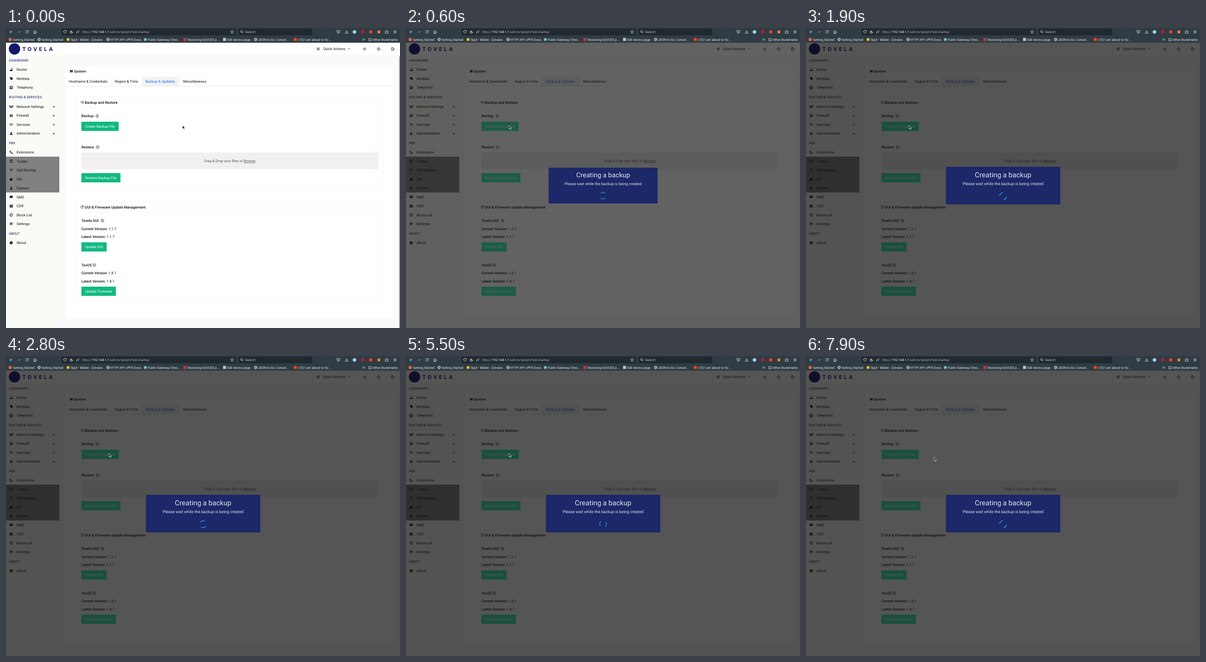
Recreate the animation shown at these times as an HTML page. Size 857 px wide and 653 px high, loop 8000 ms.

```html
<!DOCTYPE html>
<html lang="en">
<head>
<meta charset="utf-8">
<title>System backup</title>
<style>
  html, body { margin: 0; width: 100%; height: 100%; overflow: hidden; background: #fafafa; }
  svg { display: block; width: 857px; height: 653px; text-rendering: geometricPrecision; }
  text { font-family: Roboto, "Noto Sans", sans-serif; white-space: pre; }
  .button { fill: #10b981; }
  .hover #create { fill: #059669; }
  .open .button { fill: #36f0ae; }
  .open #scrollbar { visibility: hidden; }
  #modal { visibility: hidden; }
  .open #modal { visibility: visible; }
</style>
</head>
<body>
<svg id="stage" viewBox="0 0 857 653"></svg>
<script>
const INK = '#111', NAVY = '#14186a', PALE = '#dfe4e8', RULE = '#f4f4f4';

const text = (x, y, s, size = 7.8, fill = INK, more = '') =>
  `<text x="${x}" y="${y}" font-size="${size}" fill="${fill}" ${more}>${s}</text>`;
const bold = (x, y, s, size = 7.9, fill = INK) => text(x, y, s, size, fill, 'font-weight="500"');
const rect = (x, y, w, h, fill, more = '') =>
  `<rect x="${x}" y="${y}" width="${w}" height="${h}" fill="${fill}" ${more}/>`;
const dot = (x, y, r, fill) => `<circle cx="${x}" cy="${y}" r="${r}" fill="${fill}"/>`;
// Icons are drawn around their own centre.
const line = (x, y, d, color = INK, w = 1) =>
  `<path transform="translate(${x} ${y})" d="${d}" fill="none" stroke="${color}" stroke-width="${w}"/>`;
const solid = (x, y, d, color = INK) =>
  `<path transform="translate(${x} ${y})" d="${d}" fill="${color}"/>`;
const ring = r => `M${-r} 0a${r} ${r} 0 1 1 ${2 * r} 0a${r} ${r} 0 1 1 ${-2 * r} 0`;
const info = (x, y) => line(x, y, ring(3) + 'M0 -.5V1.7M0 -1.8V-1', INK, .8);
const globe = x => line(x, 25, ring(3.2) + 'M-3.2 0H3.2M0 -3.2C-2.2 -1 -2.2 1 0 3.2C2.2 1 2.2 -1 0 -3.2', PALE, .8);

const user = 'M-1.6 -1.7a1.6 1.6 0 1 1 3.2 0a1.6 1.6 0 1 1 -3.2 0M-3 3V2Q-3 .6 0 .6Q3 .6 3 2V3Z';
const grid = 'M-3 -2.5H3V2.8H-3ZM-3 -.8H3M-3 1H3M0 -.8V2.8';
const reload = 'M2.4 -1.8A3 3 0 1 0 3 .5M2.8 -3.3V-1.2H.7';

function browser() {
  const marks = [[15, 'Getting Started'], [77.5, 'Getting Started'], [141, 'Spot - Wallet - Zolvane'],
    [227, 'HTTP API | IPFS Docs'], [308, 'Public Gateway Chec...'], [395, 'Resolving EACCES p...'],
    [481, 'Edit device page.'], [548, 'JSON-to-Go: Conver...'], [635.5, '(15) I am about to for...'],
    [798, 'Other Bookmarks']];
  return rect(0, 0, 857, 32, '#303c44') +
    rect(121, 1, 379, 15, '#20292f', 'rx="2"') + rect(505, 1, 161, 15, '#20292f', 'rx="2"') +
    line(11, 8.5, 'M3.5 0H-3M0 -3L-3 0L0 3', '#8fd0ee') +
    line(28.5, 8.5, 'M-3.5 0H3M0 -3L3 0L0 3', '#77828a') +
    line(46, 8.5, reload, PALE) +
    line(63, 8.5, 'M-3.6 0L0 -3.3L3.6 0M-2.6 -.6V3.2H2.6V-.6M0 3V1', PALE) +
    line(128.5, 8.5, 'M0 -3.5L3 -2.5Q3 2 0 3.6Q-3 2 -3 -2.5Z', PALE, .9) +
    line(142, 8.5, 'M-2.6 -.5H1.5V3H-2.6ZM-1.8 -.5V-2Q-.5 -4 .8 -2V-.5M1.5 3L3.5 0', PALE, .9) +
    line(156, 8.5, 'M-3 -1.5H3.3M1.5 -3L3.3 -1.5M3 1.5H-3.3M-1.5 3L-3.3 1.5', PALE, .8) +
    text(164.7, 11.1, 'https://<tspan fill="#fff">192.168.1.1</tspan>/admin/system?tab=backup', 7, '#a3adb4') +
    line(492, 8.5, 'M0 -3.7L1.1 -1.2L3.7 -1L1.7 .8L2.3 3.4L0 2L-2.3 3.4L-1.7 .8L-3.7 -1L-1.1 -1.2Z', PALE, .8) +
    line(513, 8, 'M-2.6 -.5a2.2 2.2 0 1 1 4.4 0a2.2 2.2 0 1 1 -4.4 0M1.3 1.2L3.3 3.3', PALE, .9) +
    text(520, 11.2, 'Search', 7.4, '#b4bcc2') +
    line(723, 8.5, 'M-3 -2.8H3V0Q2.5 3 0 3Q-2.5 3 -3 0ZM-1.5 -.7L0 .8L1.5 -.7', PALE, .9) +
    line(741, 8.5, 'M0 -3.5V1M-2 -1L0 1L2 -1M-3 1V3H3V1', PALE, .9) +
    dot(758, 8.5, 3.8, '#a3d3f0') + dot(776, 8.5, 3.8, '#b3202c') +
    dot(793.5, 8.5, 3.5, '#e5442f') + dot(811, 8.5, 3.6, '#e07a2c') +
    line(828, 8.5, 'M-3 -1.5H-1V-2.5Q0 -4 1 -2.5V-1.5H3V3H-3V1.5Q-.8 .8 -3 .2Z', PALE, .9) +
    line(846, 8.5, 'M-3 -2.3H3M-3 0H3M-3 2.3H3', PALE, .9) +
    dot(9, 25, 3.5, '#e8663a') + globe(72) + dot(135, 25, 3.3, '#e9b52b') + globe(222) +
    dot(303, 25, 3.3, '#6cbcc6') + rect(386, 21.7, 6.5, 6.5, '#cb3837') +
    rect(472, 21.7, 6.5, 6.5, '#b9c9c0') + globe(543) + dot(629.5, 25, 3.6, '#ff4500') +
    line(778, 25, 'M-2.8 -2.5L-.3 0L-2.8 2.5M.4 -2.5L2.9 0L.4 2.5', PALE, .9) +
    line(792, 25, 'M-3 -2.3H-.7L.2 -1.3H3V2.6H-3Z', PALE, .9) +
    marks.map(([x, s]) => text(x, 27.5, s, 7, '#e6eaed')).join('');
}

function header() {
  return rect(0, 32, 857, 28, '#fff') + rect(116, 59.5, 741, .6, '#eee') +
    dot(18.5, 45.5, 12.3, NAVY) +
    text(35.5, 49.6, 'TOVELA', 11.5, NAVY, 'style="font-family:Inter,sans-serif" font-weight="700" letter-spacing="4"') +
    line(679, 45.5, 'M-3 -2H3M-3 0H3M-3 2H3', INK, .9) +
    text(690, 48.2, 'Quick Actions') +
    line(746, 45.2, 'M-2 -1L0 1L2 -1', INK, .9) +
    line(780, 45.8, ring(1.5) + 'M0 -3.6V-2.4M0 2.4V3.6M-3.6 0H-2.4M2.4 0H3.6M-2.5 -2.5L-1.8 -1.8M2.5 -2.5L1.8 -1.8M-2.5 2.5L-1.8 1.8M2.5 2.5L1.8 1.8', INK, .8) +
    line(810.5, 45.8, ring(3) + 'M-1 -.7Q-.8 -1.9 .2 -1.7Q1.6 -1.1 0 .5M0 1.3V2', INK, .8) +
    line(841.5, 45.8, 'M.8 -1.8V-3H-2.8V3H.8V1.8M-1 0H3.2M1.8 -1.5L3.3 0L1.8 1.5', INK, .9);
}

function sidebar() {
  const heads = [[70, 'DASHBOARD'], [150, 'ROUTING &amp; SERVICES'], [250, 'PBX'], [447, 'ABOUT']];
  // y, label, icon path, outlined icon, expandable
  const items = [
    [90.5, 'Router', 'M-3 .5H3V3H-3ZM1 .5H1.8V-2H1ZM-1 -2.3Q1.4 -4.3 3.6 -2.3L3 -1.7Q1.4 -3.2 -.4 -1.7Z'],
    [110, 'Netdata', 'M-3.4 -2.8H0Q3.5 -2.5 3.2 .5Q3 3 0 3Q-1.2 3 -1.8 .5Z'],
    [129.5, 'Telephony', 'M-3 -2.6H3V2.8H-3ZM-1 -2.6V2.8M.5 -.9H2M.5 .6H2M.5 2H2', 1],
    [171, 'Network Settings', 'M0 -1V3.3M-1.7 3.2L0 -1L1.7 3.2M-2 -2.4Q-3.2 -.8 -2 .8M2 -2.4Q3.2 -.8 2 .8M-3.2 -3Q-4.4 0 -3.2 2M3.2 -3Q4.4 0 3.2 2', 1, 1],
    [190.5, 'Firewall', 'M-3 -2.6H-.3V-1H-3ZM.3 -2.6H3V-1H.3ZM-3 -.6H-1.3V1H-3ZM-.8 -.6H.8V1H-.8ZM1.3 -.6H3V1H1.3ZM-3 1.4H-.3V3H-3ZM.3 1.4H3V3H.3Z', 0, 1],
    [210, 'Services', 'M-1.6 -2.2L-3.3 0L-1.6 2.2M1.6 -2.2L3.3 0L1.6 2.2M.7 -2.6L-.7 2.6', 1, 1],
    [229.5, 'Administration', user, 0, 1],
    [270.5, 'Extensions', 'M-2.7 -3L-1 -2.7L-.8 -1L-1.6 -.2Q-.8 1.1 .4 1.7L1.2 .8L2.8 1.2L3 2.8Q1.8 3.4 0 2.4Q-3.2 .2 -2.7 -3', 1],
    [290, 'Trunks', 'M-3.3 -1V-2.4Q0 -3.8 3.3 -2.4V-1M-1 -2.6V-.5Q-2.8 .8 -2.6 2.5H2.6Q2.8 .8 1 -.5V-2.6', 1],
    [309.5, 'Call Routing', 'M0 3V.5L-2.6 -2.3M0 .5L2.6 -2.3M-2.8 -.5V-2.5H-.8M2.8 -.5V-2.5H.8', 1],
    [329, 'IVR', 'M-.4 -3.2H.4V-1.9Q2.5 -1.7 2.6 .3H3.3V2H2.5V3H-2.5V2H-3.3V.3H-2.6Q-2.5 -1.7 -.4 -1.9Z'],
    [348.5, 'Queues', user],
    [368, 'SMS', 'M-3 -2.8H3.2V1.7H-1.7L-3 3Z'],
    [387.5, 'CDR', grid, 1],
    [407, 'Block List', ring(3.2) + 'M-2.3 2.3L2.3 -2.3', 1],
    [426, 'Settings', ring(2.2) + ring(.7) + 'M0 -3.4V-2.2M0 2.2V3.4M-3 -1.7L-2 -1.1M2 1.1L3 1.7M-3 1.7L-2 1.1M2 -1.1L3 -1.7', 1],
  ];
  return rect(0, 60, 116, 593, '#fafaf6') + rect(0, 280, 116, 78, '#808080') +
    heads.map(([y, s]) => text(6.5, y + 2.6, s, 7.25, NAVY)).join('') +
    items.map(([y, s, d, outlined, more]) =>
      (outlined ? line : solid)(11.3, y, d) + text(23, y + 2.8, s) +
      (more ? line(104, y + .3, 'M-2.2 0H2.2M0 -2.2V2.2', INK, .8) : '')).join('') +
    dot(11.3, 467.5, 3.2, INK) +
    line(11.3, 467.5, 'M-1 -.7Q-.8 -1.9 .2 -1.7Q1.6 -1.1 0 .5M0 1.3V2', '#fff', .7) +
    text(23, 470.3, 'About');
}

const button = (y, w, s, id = '') =>
  `<rect class="button" ${id} x="164" y="${y}" width="${w}" height="20" rx="1"/>` +
  text(172, y + 12.6, s, 7.8, '#fff');
const card = (y, h, s, icon) =>
  rect(151.5, y, 670.5, h, '#fff', `rx="2" stroke="${RULE}" stroke-width=".8"`) +
  rect(152, y + 24, 670, .8, RULE) + icon + bold(171.3, y + 15.3, s, 8);
const version = (y, s, n) =>
  bold(164, y, `${s} Version: <tspan font-weight="400">${n}</tspan>`, 7.85);

function content() {
  return rect(128, 82, 717, 548, '#fff', `stroke="${RULE}" stroke-width=".6"`) +
    rect(139, 91.6, 2.8, 2.2, INK) + rect(142.2, 91.6, 3, 2.2, INK) +
    rect(139, 94.2, 2.8, 2.2, INK) + rect(142.2, 94.2, 3, 2.2, INK) +
    bold(147.7, 96.9, 'System') + rect(128, 105.5, 717, .7, RULE) +
    rect(295.5, 106.5, 81.5, 19.5, '#f1f3f5', 'rx="1"') + rect(128, 126, 717, .9, '#e3e5e8') +
    text(136.7, 119.2, 'Hostname &amp; Credentials') + text(236.8, 119.2, 'Region &amp; Time') +
    text(303.5, 119.2, 'Backup &amp; Updates', 7.9, '#2563eb') + text(385.5, 119.2, 'Miscellaneous') +

    card(149.5, 204, 'Backup and Restore', line(166, 162, 'M-2.6 -.3A2.8 2.8 0 1 1 -1.4 2.3M-3.7 -1L-2.6 .3L-1.3 -.9M.3 -1.5V.2L1.4 .9', INK, .8)) +
    bold(164, 194.4, 'Backup') + info(198.5, 191.7) +
    button(204, 81, 'Create Backup File', 'id="create"') +
    bold(164, 262, 'Restore') + info(199.3, 259.3) +
    rect(164, 271, 646, 36.5, '#f1f0ef', 'rx="2.5"') +
    text(431, 292.2, 'Drag &amp; Drop your files or <tspan text-decoration="underline">Browse</tspan>', 7.8, '#555') +
    button(316, 85, 'Restore Backup File') +

    card(377.5, 217, 'GUI &amp; Firmware Update Management', line(165.6, 389.6, reload + 'M0 -1.3V.3L1.2 1', INK, .8)) +
    bold(164, 422, 'Tovela GUI') + info(209.8, 419.3) +
    version(439.5, 'Current', '1.1.7') + version(457, 'Latest', '1.1.7') +
    button(466.5, 55, 'Update GUI') +
    bold(164, 518.8, 'TovOS') + info(192, 516.1) +
    version(536.3, 'Current', '1.8.1') + version(553.8, 'Latest', '1.8.1') +
    button(563, 75, 'Update Firmware') +
    rect(855.3, 62, 1.7, 591, '#8a8a8a', 'id="scrollbar"');
}

// The modal is drawn around its centre so that it can be scaled.
const modal = `<g id="modal">${rect(-124.3, -41, 248.6, 82, '#1c2868', 'rx="2"')}
  ${text(0, -18.5, 'Creating a backup', 15.3, '#e2e6f0', 'text-anchor="middle"')}
  ${text(0, -1, 'Please wait while the backup is being created', 8.75, '#e2e6f0', 'text-anchor="middle"')}
  <path id="spinner" d="M-5.3 -5.3A7.5 7.5 0 0 1 5.3 -5.3M5.3 5.3A7.5 7.5 0 0 1 -5.3 5.3"
    fill="none" stroke="#2778c4" stroke-width="2.1"/></g>`;
const cursor = `<path id="cursor" d="M0 0V7.6L1.8 6.1L3.1 8.9L4.5 8.3L3.2 5.5H5.6Z" fill="#111" stroke="#fff" stroke-width=".7"/>`;

const $ = id => document.getElementById(id);
$('stage').innerHTML = rect(0, 32, 857, 621, '#fafafa') + content() + sidebar() + header() +
  rect(0, 32, 857, 621, '#0e0e0e', 'id="shade"') + browser() + modal + cursor;

const clamp = v => Math.max(0, Math.min(1, v));
const smooth = v => v * v * (3 - 2 * v);
const mix = (a, b, v) => a + (b - a) * v;

// Pop-in: overshoot, dip, settle.
function popScale(ms) {
  const keys = [[0, .7], [135, 1.05], [240, .95], [300, 1]];
  for (let i = 1; i < keys.length; i++) {
    const [t0, a] = keys[i - 1], [t1, b] = keys[i];
    if (ms < t1) return mix(a, b, 1 - (1 - (ms - t0) / (t1 - t0)) ** 2.2);
  }
  return 1;
}

function draw() {
  const t = Math.floor(performance.now() % 8000 / 100) * 100;
  const open = t >= 600;
  const arrive = smooth(clamp(t / 450)), leave = smooth(clamp((t - 6500) / 600));
  const x = mix(mix(384, 224, arrive), 278.3, leave), y = mix(212, 220.3, leave);
  $('cursor').setAttribute('transform', `translate(${x} ${y})`);
  $('stage').setAttribute('class', open ? 'open' : x < 245 ? 'hover' : '');
  $('shade').setAttribute('opacity', open ? (t < 700 ? .65 : .7) : 0);
  $('modal').setAttribute('transform', `translate(428.7 343) scale(${popScale(t - 540)})`);
  const spin = t > 2400 && t < 2800 ? 2400 : t; // brief stall
  $('spinner').setAttribute('transform', `translate(0 23) rotate(${(spin - 590) * .24})`);
  requestAnimationFrame(draw);
}
draw();
</script>
</body>
</html>
```
